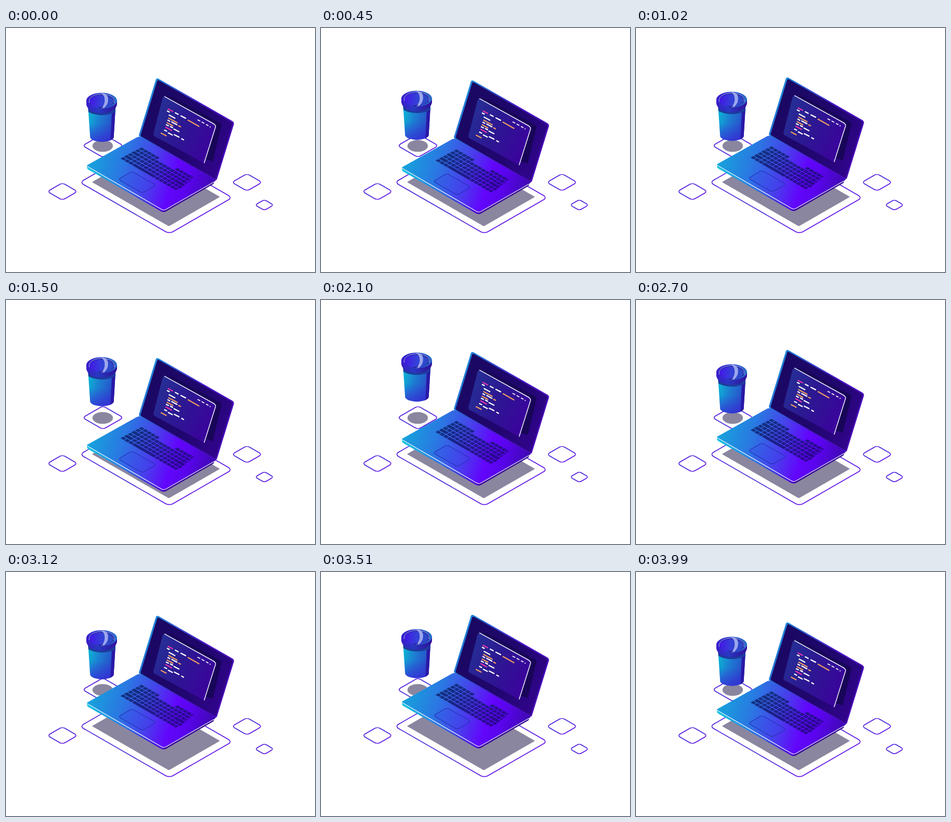
Recreate the animation shown at these times as an HTML page without scripts. Size 604 px wide and 479 px high, loop 4.56 s.

```html
<!DOCTYPE html>
<html lang="en">
<head>
<meta charset="utf-8">
<title>Floating laptop and cup</title>
<style>
  /* whole-pixel motion: integers are rounded while animating */
  @property --y { syntax: "<integer>"; inherits: false; initial-value: 0; }
  html, body { margin: 0; width: 100%; height: 100%; overflow: hidden; background: #fff; }
  svg { display: block; width: 100vw; height: 100vh; }
  .laptop, .cup { transform: translateY(calc(var(--y) * 1px)); animation: laptop 4560ms linear infinite; }
  .cup { animation-name: cup; }
  .mat { fill: none; stroke: url(#edge); stroke-width: 1.6; }
  .mat rect, .pad { vector-effect: non-scaling-stroke; }
  .shade { fill: #211848; opacity: .52; }
  .keys { fill: none; stroke: url(#key); stroke-width: .78; stroke-dasharray: .84 .16; }
  .code { fill: none; stroke-width: 2.5; stroke-linecap: round; }
  @keyframes laptop {
    0%, 87.5%, 100% { --y: 0; }
    6.25% { --y: 10; }
    17.76% { --y: -10; }
    23.68% { --y: 0; }
    36.4% { --y: 20; }
    53.95% { --y: -10; }
    59.87% { --y: 0; }
    73.46% { --y: -20; }
  }
  @keyframes cup {
    0%, 87.5%, 100% { --y: 0; }
    6.25% { --y: -10; }
    12.17% { --y: 0; }
    17.76% { --y: -10; }
    23.68% { --y: 0; }
    42.43% { --y: -30; }
    59.87% { --y: 0; }
    73.46% { --y: -20; }
  }
</style>
</head>
<body>
<svg viewBox="0 0 604 479">
  <defs>
    <linearGradient id="edge">
      <stop offset="0" stop-color="#4a12dc"/><stop offset=".5" stop-color="#3d24d2"/><stop offset="1" stop-color="#5a0ae6"/>
    </linearGradient>
    <linearGradient id="deck" gradientUnits="userSpaceOnUse" x1="170" y1="250" x2="400" y2="320">
      <stop offset="0" stop-color="#17a0dc"/><stop offset=".25" stop-color="#2a78e2"/>
      <stop offset=".5" stop-color="#4a3cec"/><stop offset=".68" stop-color="#6206fc"/>
      <stop offset=".8" stop-color="#5a04ee"/><stop offset="1" stop-color="#4008b4"/>
    </linearGradient>
    <linearGradient id="side" gradientUnits="userSpaceOnUse" x1="158" y1="0" x2="410" y2="0">
      <stop offset="0" stop-color="#10c8e0"/><stop offset=".3" stop-color="#2e74e6"/>
      <stop offset=".58" stop-color="#5008d8"/><stop offset=".61" stop-color="#3a0698"/><stop offset="1" stop-color="#340a8c"/>
    </linearGradient>
    <linearGradient id="rim" gradientUnits="userSpaceOnUse" x1="262" y1="150" x2="440" y2="230">
      <stop offset="0" stop-color="#1a92da"/><stop offset=".25" stop-color="#2d58d4"/>
      <stop offset=".6" stop-color="#4a14cc"/><stop offset="1" stop-color="#4a0ab8"/>
    </linearGradient>
    <linearGradient id="bezel" gradientUnits="userSpaceOnUse" x1="270" y1="150" x2="435" y2="250">
      <stop offset="0" stop-color="#1a0862"/><stop offset=".6" stop-color="#20066e"/><stop offset="1" stop-color="#31048c"/>
    </linearGradient>
    <linearGradient id="pane" gradientUnits="userSpaceOnUse" x1="290" y1="170" x2="400" y2="230">
      <stop offset="0" stop-color="#262e96"/><stop offset=".45" stop-color="#2c1892"/><stop offset="1" stop-color="#3a049c"/>
    </linearGradient>
    <linearGradient id="key" gradientUnits="userSpaceOnUse" x1="0" y1="0" x2="14" y2="0">
      <stop offset="0" stop-color="#123080"/><stop offset=".5" stop-color="#1e1c8a"/><stop offset="1" stop-color="#2a0690"/>
    </linearGradient>
    <linearGradient id="body" x1="0" y1=".25" x2="1" y2=".6">
      <stop offset="0" stop-color="#08bcd4"/><stop offset=".4" stop-color="#1c80d2"/><stop offset="1" stop-color="#2c40c8"/>
    </linearGradient>
    <linearGradient id="fade" x1="0" y1="0" x2="0" y2="1">
      <stop offset=".5" stop-color="#3a20d8" stop-opacity="0"/><stop offset="1" stop-color="#3a20d8" stop-opacity=".7"/>
    </linearGradient>
    <linearGradient id="band">
      <stop offset="0" stop-color="#3a1cc8"/><stop offset=".4" stop-color="#2838c0"/><stop offset=".75" stop-color="#2c20a8"/><stop offset="1" stop-color="#3410a0"/>
    </linearGradient>
    <linearGradient id="brim">
      <stop offset="0" stop-color="#3a1cd0"/><stop offset=".5" stop-color="#2a46cc"/><stop offset="1" stop-color="#2a72cc"/>
    </linearGradient>
    <linearGradient id="well">
      <stop offset="0" stop-color="#4416e6"/><stop offset=".5" stop-color="#3440d8"/><stop offset="1" stop-color="#2a4cc4"/>
    </linearGradient>
    <clipPath id="cupShape"><path d="M160 150 L164.500 215 Q168 222.500 187.500 223.500 Q207 222.500 210.500 215 L214.500 150Z"/></clipPath>
  </defs>

  <g class="mat">
    <rect transform="matrix(.866 .5 .866 -.5 144.300 303)" width="202" height="142" rx="8"/>
    <rect transform="matrix(.866 .5 .866 -.5 149.700 231)" width="46" height="46" rx="6"/>
    <rect transform="matrix(.866 .5 .866 -.5 80.800 321)" width="34" height="34" rx="6"/>
    <rect transform="matrix(.866 .5 .866 -.5 441.600 303)" width="34" height="34" rx="6"/>
    <rect transform="matrix(.866 .5 .866 -.5 486.800 347.500)" width="21" height="21" rx="5"/>
  </g>
  <rect class="shade" transform="matrix(.866 .5 .866 -.5 168 302.500)" width="173.500" height="115.500" rx="2"/>
  <ellipse class="shade" cx="189" cy="231.500" rx="20" ry="11.500"/>

  <g class="cup">
    <g clip-path="url(#cupShape)">
      <path fill="url(#body)" d="M158 150H216V226H158Z"/>
      <path fill="url(#fade)" d="M158 150H216V226H158Z"/>
      <path fill="#2a18a6" d="M207 160H216V226H204Z"/>
      <path fill="#1c3c9c" d="M158 150H216V163Q204 171 187 171 Q170 171 158 163Z"/>
    </g>
    <path fill="url(#band)" d="M157 142.500 V150 C159 161 172 167.500 187 167.500 C202 167.500 215 161 217 150 V142.500Z"/>
    <ellipse cx="187" cy="142.500" rx="30" ry="15.300" fill="url(#brim)"/>
    <ellipse cx="187" cy="143" rx="25.500" ry="13.200" fill="#241a9c"/>
    <ellipse cx="186.500" cy="144" rx="23.500" ry="12.500" fill="url(#well)"/>
    <path fill="none" stroke="#a9b8f4" stroke-width="1" d="M163 147 C160 136 173 130 187 129.600 C201 130 214 136 211 147"/>
    <path fill="#c6cdf6" opacity=".72" d="M186 128 Q196 128 199 135 Q202 148 192 157 L184 158 Q193 153 193 142 Q193 132 186 128Z"/>
    <path fill="none" stroke="#1c1680" stroke-width="1.500" stroke-linecap="round" d="M182 156Q186 158 189 155"/>
  </g>

  <g class="laptop">
    <path fill="url(#side)" d="M158.500 269 V274.500 Q158.500 276.500 161 278 L303 360 Q308 362.500 313 360 L405 306.500 Q407 304.500 407 299Z"/>
    <path fill="url(#deck)" d="M160 268.500 L256 214.500 Q260 212.500 264 214.500 L409 297.500 Q411 299.500 408 301 L312 356 Q308 358.500 304 356 L160 272 Q157 270.500 160 268.500Z"/>
    <path fill="none" stroke="#e4ecff" stroke-width="1.400" stroke-linecap="round" d="M159 271.500 L303 355.500 Q308 359 313 356 L406 302.500"/>

    <path fill="url(#rim)" d="M293 101 Q294.500 97.800 298 99.500 L443 183 Q446.500 185.500 445.500 189 L412.500 296.500 Q411.500 299.500 408.500 298 L262 214 Q259 212 260 209Z"/>
    <path fill="url(#bezel)" d="M295.500 104 Q296.500 101.500 299 103 L441 185 Q443.500 186.500 442.500 189.500 L411 293 Q410 296.500 407 295 L265.500 213.500 Q262.500 212 263.500 209Z"/>
    <path fill="#180558" d="M322 133.500 L418 186 Q422 188.500 421 192 L404 262 L387 256 L310 140Z"/>
    <path fill="url(#pane)" d="M306 138 Q308 133.500 312 135.500 L406 188 Q410.500 191 409.500 194 L387 265 L291 213 Q287 210.500 288.500 206.500Z"/>
    <path fill="none" stroke="#f4f2ff" stroke-width="1.500" stroke-linecap="round" d="M310 134.700 L405 187.500 Q410.500 190.800 409.500 194.500 L387.500 264.500"/>

    <g class="code">
      <path stroke="#fff" d="M331 166.500l5.500 3M342 172.500l9 4.700M315.500 163l3.500 1.800M319 171l11 6M316.500 181l3.500 2M324 184.500l10 5.300M313.500 190l4 2M321.500 193.500l4 2.200M328.500 198.500l9.500 5M310 200.500l4 2M317.500 206l7.500 4M329 209.500l9 4.700M343.500 217.500l3.500 2"/>
      <path stroke="#fff" stroke-width="1.800" d="M375 180.500l4 2M383 184.800l4 2.200M391.500 189.500l3.500 2M399 194v.3"/>
      <path stroke="#e834a8" d="M317 159l8.500 4.500M312.500 195l11 6"/>
      <path stroke="#ea9a60" d="M356 181l21 12M318 177l16.500 9M315 186l11 5.800M337.500 192l3.500 1.800M303.500 206.500l9.500 5"/>
    </g>

    <g class="keys" transform="matrix(7.400 4.270 7.100 -3.830 223 256.700)">
      <path d="M0 .5H3M9 .5H14.600M0 1.500H14.700M0 2.500H14.500M0 3.500H14.300M0 4.500H14.200M0 5.500H5M9.500 5.500H13.850"/>
      <path stroke-dasharray="none" d="M3 .5H8.840M0 1.500H1.400M12.600 2.500H14.300M0 3.500H1.600"/>
    </g>
    <rect class="pad" transform="matrix(.866 .5 .866 -.5 219.500 297)" width="54" height="31" rx="5" fill="#3a4ae6" fill-opacity=".3" stroke="#2430b8" stroke-width="1.200"/>
  </g>
</svg>
</body>
</html>
```
